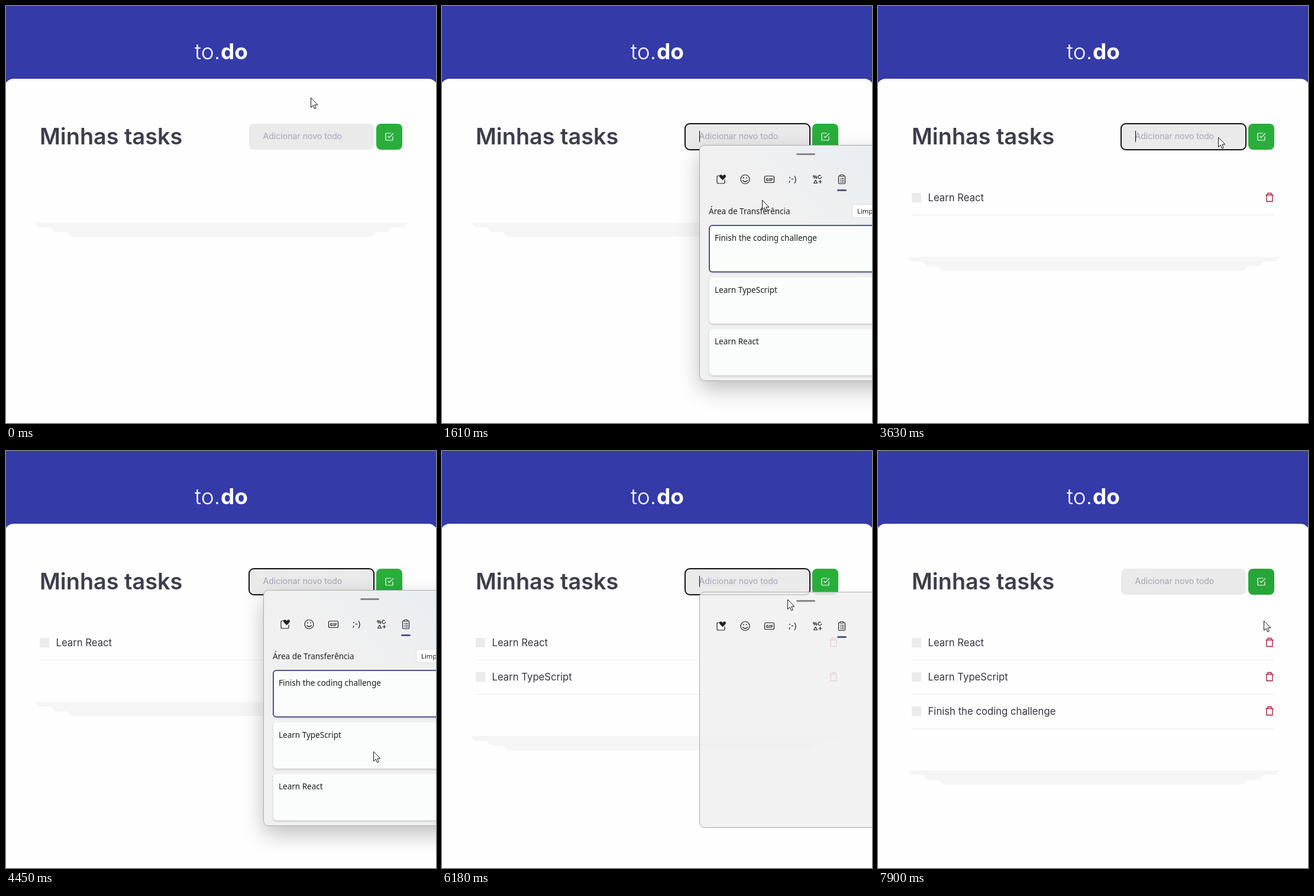
An HTML page with a canvas for the animation above (8000 ms loop, 727x705 px).

```html
<!DOCTYPE html>
<html lang="pt-BR">
<head>
<meta charset="utf-8">
<title>to.do</title>
<style>
  html, body { margin: 0; width: 100%; height: 100%; overflow: hidden; background: #fefefe; }
  canvas { display: block; }
</style>
</head>
<body>
<canvas id="stage" width="727" height="705"></canvas>
<script>
const ctx = document.getElementById('stage').getContext('2d');
const LOOP = 8000;
const BLINK = 580;
const MOVE = 310;
const ROW = 58;
const UI = 'Inter, sans-serif';
const PANEL = '"Noto Sans", sans-serif';
const CLIPS = ['Finish the coding challenge', 'Learn TypeScript', 'Learn React'];

// Each round focuses the field, opens the clipboard panel, pastes a clip and adds it.
const ROUNDS = [
  { focus: 440, open: 1300, paste: 2140 },
  { focus: 3600, open: 4030, paste: 4830 },
  { focus: 5920, open: 6180, paste: 6930 }
].map((round, i) => ({
  ...round,
  clip: CLIPS.length - 1 - i,
  ready: round.open + 150,
  fade: round.paste + 400,
  close: round.paste + 530,
  add: round.paste + 730
}));

// The pointer rests at each stop and glides to the next just before its arrival time.
const BUTTON = { x: 646, y: 222 };
const STOPS = [
  { at: 0, x: 515, y: 155 },
  { at: 440, x: 525, y: 222 },
  { at: 1610, x: 541, y: 328 },
  { at: 1920, x: 578, y: 570 },
  { at: 2540, x: 599, y: 282 },
  { at: 2790, ...BUTTON },
  { at: 3470, x: 575, y: 222 },
  { at: 4450, x: 621, y: 508 },
  { at: 5400, ...BUTTON },
  { at: 5920, x: 584, y: 222 },
  { at: 6180, x: 584, y: 251 },
  { at: 6550, x: 579, y: 416 },
  { at: 7560, ...BUTTON },
  { at: 7900, x: 652, y: 287 }
];

function pointerAt(t) {
  const next = STOPS.findIndex(stop => stop.at > t);
  if (next < 1) return STOPS.at(next);
  const from = STOPS[next - 1], to = STOPS[next];
  const start = Math.max(from.at, to.at - MOVE);
  const p = Math.max(0, (t - start) / (to.at - start));
  const eased = p * p * (3 - 2 * p);
  return { x: from.x + (to.x - from.x) * eased, y: from.y + (to.y - from.y) * eased };
}

function box(x, y, w, h, r, fill, stroke, line = 1) {
  ctx.beginPath();
  ctx.roundRect(x, y, w, h, r);
  if (fill) { ctx.fillStyle = fill; ctx.fill(); }
  if (stroke) { ctx.strokeStyle = stroke; ctx.lineWidth = line; ctx.stroke(); }
}

function text(str, x, y, font, color) {
  ctx.font = font;
  ctx.fillStyle = color;
  ctx.fillText(str, x, y);
}

function shape(d, x, y, { scale = 1, fill, stroke, line = 1 }) {
  const path = new Path2D(d);
  ctx.save();
  ctx.translate(x, y);
  ctx.scale(scale, scale);
  if (fill) { ctx.fillStyle = fill; ctx.fill(path); }
  if (stroke) {
    ctx.strokeStyle = stroke;
    ctx.lineWidth = line;
    ctx.lineCap = ctx.lineJoin = 'round';
    ctx.stroke(path);
  }
  ctx.restore();
}

function drawPage() {
  box(0, 0, 727, 140, 0, '#343aa8');
  box(-3, 123, 733, 600, 16, '#fefefe');
  text('to.', 319, 90, `350 37px ${UI}`, '#fff');
  text('do', 363, 90, `700 37px ${UI}`, '#fff');
  text('Minhas tasks', 57, 234, `600 37.8px ${UI}`, '#3d3d4d');
}

function drawTasks(tasks) {
  tasks.forEach((task, i) => {
    const y = 316 + i * ROW;
    box(57, y, 16, 16, 0, '#ebebeb');
    box(57, y + 37, 613, 1, 0, '#ebebeb');
    text(task, 84.5, y + 14, `16.7px ${UI}`, '#35353f');
    shape('M-6 -4H6M-3 -4V-7H3V-4M-5 -4V7H5V-4', 662, y + 7.5, { stroke: '#b01030', line: 1.3 });
  });
  // Stepped shade under the list.
  for (let i = 0; i < 3; i++) {
    const inset = 48 + i * 27;
    shape(`M${inset} 0H${728 - inset}l-8 8H${inset + 8}Z`,
      0, 366 + tasks.length * ROW + i * 8, { fill: '#f5f5f5' });
  }
}

function squiggle(from, to) {
  ctx.beginPath();
  for (let x = from; x <= to; x += 2) ctx.lineTo(x, (x - from) % 4 ? 229 : 226.8);
  ctx.strokeStyle = '#e33a3a';
  ctx.lineWidth = 1;
  ctx.stroke();
}

function drawField(focused, value, caretOn) {
  box(411, 199, 211, 44, 8, '#eaeaea', focused && '#111', 2);
  let caret = 435;
  if (value) {
    const font = `14px ${UI}`;
    ctx.font = font;
    const widthOf = str => ctx.measureText(str).width;
    const left = 435 - Math.max(0, widthOf(value) - 163);
    caret = left + widthOf(value);
    ctx.save();
    ctx.beginPath();
    ctx.rect(435, 200, 164, 42);
    ctx.clip();
    text(value, left, 225, font, '#3d3d4d');
    for (const word of value.matchAll(/\S+/g)) {
      const start = left + widthOf(value.slice(0, word.index));
      squiggle(start, start + widthOf(word[0]));
    }
    ctx.restore();
  } else {
    text('Adicionar novo todo', 434.5, 225, `14.1px ${UI}`, '#a5a2b5');
  }
  if (focused && caretOn) box(Math.round(caret), 211, 1, 19, 0, '#000');
}

function drawButton(hover) {
  box(626, 199, 44, 44, 8, hover ? '#27a638' : '#29ae3c');
  shape('M9 11l3 3L22 4M21 12v7a2 2 0 0 1-2 2H5a2 2 0 0 1-2-2V5a2 2 0 0 1 2-2h11',
    640, 213, { scale: 2 / 3, stroke: '#fff', line: 1.8 });
}

function drawPanelIcons() {
  const ink = '#222';
  const outline = { stroke: ink, line: 1.2 };
  shape('M1 -6H-5Q-7 -6 -7 -4V5Q-7 7 -5 7H4Q6 7 6 5V1', 472, 293, outline);
  shape('M0 5L-5 0C-7 -4 -2 -6 0 -2C2 -6 7 -4 5 0Z', 474.5, 289.5, { fill: ink });

  box(505, 285.5, 15, 15, 7.5, null, ink, 1.2);
  shape('M-4 2Q0 6 4 2', 512.5, 293, outline);
  for (const eye of [509, 514]) box(eye, 289.5, 2, 2, 1, ink);

  box(545.5, 287.5, 16, 11, 2, null, ink, 1.2);
  text('GIF', 547.5, 296, `700 7.5px ${PANEL}`, ink);
  text(';-)', 586, 297, `15px ${PANEL}`, ink);
  text('%', 627, 292, `700 8.5px ${PANEL}`, ink);
  shape('M5 -6.5A2.8 2.8 0 1 0 6.5 -4M-6.5 6.5l3 -5l3 5ZM2 4h5M4.5 1.5v5', 635, 293, outline);

  box(670.5, 287, 11, 13.5, 1.5, null, ink, 1.2);
  box(673, 285.5, 6, 2.5, 1, '#f0f0f0', ink, 1.2);
  for (let y = 291; y < 299; y += 3) {
    box(673, y, 1.5, 1.2, 0, ink);
    box(675.5, y, 4, 1.2, 0, ink);
  }
}

function drawClip(clip, i, selected, flat) {
  const y = 371 + i * 87.5;
  ctx.save();
  ctx.globalAlpha = 1;
  if (!flat) {
    ctx.shadowColor = 'rgba(0,0,0,.2)';
    ctx.shadowBlur = 3;
    ctx.shadowOffsetY = 1.5;
  }
  box(452, y, 340, 78.5, 6, flat ? '#fcfcfc' : '#fbfdfc', flat && '#e4e4e4');
  ctx.restore();
  if (selected) box(452, y, 340, 78.5, 5, null, '#4e5585', 2);
  text(clip, 461, y + 26, `13.5px ${PANEL}`, '#1c1c1c');
}

function drawPanel(t, round) {
  const opening = t < round.ready;
  const fading = t >= round.fade;
  const settled = !opening && !fading;
  const frame = (fill, stroke) => box(435.5, 235.5, 360, 398, 8, fill, stroke);

  ctx.save();
  ctx.translate(0, opening ? 3 : fading ? 4 : 0);
  ctx.save();
  if (settled) {
    ctx.shadowColor = 'rgba(0,0,0,.25)';
    ctx.shadowBlur = 36;
    ctx.shadowOffsetY = 14;
  } else {
    ctx.globalAlpha = 0.85;
  }
  frame('#f0f0f0');
  ctx.restore();
  if (settled) {
    const tint = ctx.createLinearGradient(600, 360, 727, 240);
    tint.addColorStop(0, '#e9eef300');
    tint.addColorStop(1, '#e9eef3');
    frame(tint);
  }
  frame(null, '#a9a9a9');

  if (fading) ctx.globalAlpha = 0.8;
  box(599, 249, 32, 3, 1.5, '#878787');
  drawPanelIcons();
  box(668, 310, 16, 3, 1.5, '#4e5585');
  if (!opening) {
    text('Área de Transferência', 451, 352, `13.5px ${PANEL}`, '#222');
    box(693.5, 335.5, 90, 22, 4, '#fdfdfd', '#e2e2e2');
    text('Limpar tudo', 702, 351, `11.3px ${PANEL}`, '#222');
    const selected = t >= round.paste ? round.clip : 0;
    CLIPS.forEach((clip, i) => drawClip(clip, i, i === selected, fading));
  }
  ctx.restore();
}

function draw(t) {
  const round = ROUNDS.find(r => t >= r.focus && t < r.add);
  const value = round && t >= round.paste ? CLIPS[round.clip] : '';
  const blinkStart = round ? (value ? round.paste : round.focus) : 0;
  const pointer = pointerAt(t);
  const hovered = pointerAt(Math.max(0, t - 200)); // the button colour lags the pointer

  drawPage();
  drawTasks(ROUNDS.filter(r => t >= r.add).map(r => CLIPS[r.clip]));
  drawField(!!round, value, Math.floor((t - blinkStart) / BLINK) % 2 === 0);
  drawButton(hovered.x > 626 && hovered.y < 243);
  if (round && t >= round.open && t < round.close) drawPanel(t, round);
  shape('M.5 .5V16.5L4.2 13L6.7 18.8L9.2 17.7L6.8 12H11.5Z', pointer.x, pointer.y,
    { fill: '#fff', stroke: '#111' });
}

function tick() {
  draw(performance.now() % LOOP);
  requestAnimationFrame(tick);
}
tick();
</script>
</body>
</html>
```
